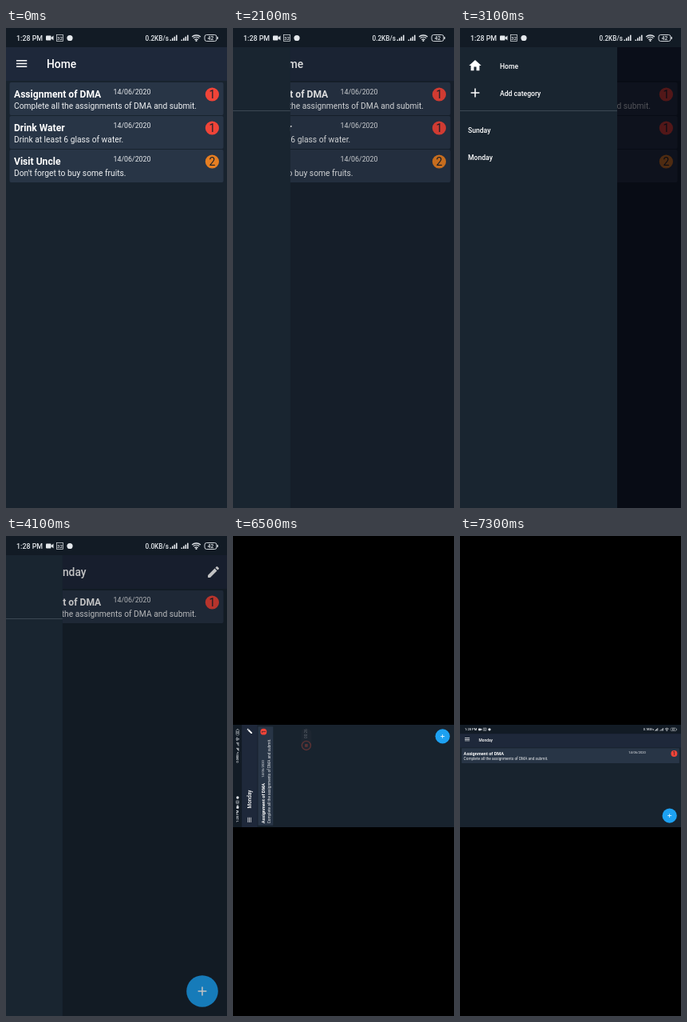
These frames come from a looping animation (277x600 px, 8000 ms). An HTML page with a canvas:

```html
<!DOCTYPE html>
<html lang="en">
<meta charset="utf-8">
<title>To-do app</title>
<style>
  html, body { margin: 0; width: 100%; height: 100%; overflow: hidden; background: #000; }
  canvas { display: block; width: 277px; height: 600px; }
</style>
<canvas></canvas>
<script>
const W = 277, H = 600, LOOP = 8000, STEP = 100;
const DRAWER = 197, LAND = W / H;
const canvas = document.querySelector('canvas');
const dpr = window.devicePixelRatio || 1;
canvas.width = W * dpr;
canvas.height = H * dpr;
const c = canvas.getContext('2d');

const RED = '#f04438', ORANGE = '#e67e22';
const TASKS = [
  ['Assignment of DMA', 'Complete all the assignments of DMA and submit.', 1, RED],
  ['Drink Water', 'Drink at least 6 glass of water.', 1, RED],
  ['Visit Uncle', "Don't forget to buy some fruits.", 2, ORANGE],
];
const ICONS = {
  home: new Path2D('M10 20v-6h4v6h5v-8h3L12 3 2 12h3v8z'),
  plus: new Path2D('M19 13h-6v6h-2v-6H5v-2h6V5h2v6h6z'),
  menu: new Path2D('M3 18h18v-2H3zM3 13h18v-2H3zM3 8h18V6H3z'),
  edit: new Path2D('M3 17.25V21h3.75L17.81 9.94l-3.75-3.75zM20.71 7.04a1 1 0 0 0 0-1.41l-2.34-2.34a1 1 0 0 0-1.41 0l-1.83 1.83 3.75 3.75z'),
};

function rect(x, y, w, h, color, r = 0) {
  c.fillStyle = color;
  c.beginPath();
  c.roundRect(x, y, w, h, r);
  c.fill();
}

function circle(x, y, r, color) {
  c.fillStyle = color;
  c.beginPath();
  c.arc(x, y, r, 0, 7);
  c.fill();
}

function text(str, x, y, size, weight = 400, color = '#fff', align = 'left') {
  c.font = `${weight} ${size}px Roboto, sans-serif`;
  c.textAlign = align;
  c.fillStyle = color;
  c.fillText(str, x, y);
}

function icon(name, x, y, scale = 0.77) {
  c.save();
  c.translate(x, y);
  c.scale(scale, scale);
  c.translate(-12, -12);
  c.fillStyle = '#fff';
  c.fill(ICONS[name]);
  c.restore();
}

function layer(draw, alpha = 1) {
  c.save();
  c.globalAlpha *= alpha;
  draw();
  c.restore();
}

function statusBar(w, speed) {
  rect(0, 0, w, 24, '#121b25');
  const ink = '#e4e8ec';
  text('1:28 PM', 13, 16, 8.9, 500, ink);
  rect(50, 9.5, 6.5, 6, ink, 1);
  c.beginPath();
  c.moveTo(56, 12.5); c.lineTo(59.5, 9.5); c.lineTo(59.5, 15.5);
  c.fill();
  c.strokeStyle = ink;
  c.lineWidth = 0.7;
  c.strokeRect(63.5, 8.5, 8, 8);
  text('32', 67.5, 15, 6, 500, ink, 'center');
  circle(80, 12.5, 3.6, ink);

  layer(() => {
    c.translate(w - W, 0);
    text(speed, 174.5, 16, 8.2, 500, ink);
    for (const x of [205.5, 219.5])
      for (let i = 0; i < 4; i++) rect(x + i * 2.5, 14.5 - i * 1.9, 1.6, 1.5 + i * 1.9, ink);
    c.lineWidth = 1.3;
    for (const r of [3, 5.6, 8]) {
      c.beginPath();
      c.arc(238.5, 17, r, -2.3, -0.84);
      c.stroke();
    }
    circle(238.5, 16, 1.1, ink);
    c.lineWidth = 0.9;
    c.beginPath();
    c.roundRect(249, 8.5, 15, 8, 2.5);
    c.stroke();
    rect(264.5, 11, 1.3, 3, ink);
    text('42', 256.5, 15, 6.5, 500, ink, 'center');
  });
}

function taskCard([title, note, level, color], y, w) {
  rect(4.5, y, w - 9, 41, '#283546', 2);
  text(title, 10, y + 19.2, 12.1, 700);
  text('14/06/2020', w - 142.4, y + 15.4, 8.8, 400, '#e8ebee');
  text(note, 10, y + 33.2, 10.27, 400, '#eef0f2');
  circle(w - 18.6, y + 15, 8.6, color);
  text(level, w - 18.6, y + 20, 14, 400, '#1b222c', 'center');
}

function screen(w, h, monday) {
  const wide = w > h, lift = wide ? 5 : 0;
  rect(0, 0, w, h, '#18232e');
  rect(0, 0, w, 66 - lift, '#1e283a');
  icon('menu', 19.6, 44.5 - lift, 0.74);
  text(monday ? 'Monday' : 'Home', 51, 50 - lift * 1.1, wide ? 10.5 : 13.8, 500);
  TASKS.slice(0, monday ? 1 : 3).forEach((task, i) => taskCard(task, 68 - lift + i * 42, w));
  if (monday) {
    if (!wide) icon('edit', w - 17, 45);
    circle(w - 31, h - 31, 19.8, '#1da1f2');
    icon('plus', w - 31, h - 31);
  }
}

function drawer(open, shade) {
  rect(0, 0, W, H, `rgba(0,0,8,${shade})`);
  layer(() => {
    c.translate(DRAWER * (open - 1), 0);
    rect(0, 0, DRAWER, H, '#192530');
    icon('home', 19, 47);
    text('Home', 50, 50.5, 8.6, 500);
    icon('plus', 19, 81);
    text('Add category', 50, 84.5, 8.6, 500);
    rect(0, 103, DRAWER, 1, '#3c4853');
    text('Sunday', 10, 130.5, 8.6, 500);
    text('Monday', 10, 164.5, 8.6, 500);
  });
}

function recorderBubble() {
  rect(208, 185, 60, 28, '#2b3038', 14);
  c.strokeStyle = '#f0503c';
  c.lineWidth = 3;
  c.beginPath();
  c.arc(221, 199, 12, 0, 7);
  c.stroke();
  rect(217, 195, 8, 8, '#f0503c', 1);
  text('00:26', 253, 202.5, 10, 400, '#fff', 'center');
}

function portrait(t) {
  const monday = t >= 4100;
  screen(W, H, monday);
  let open = 0;
  if (t >= 2100 && t < 4100) open = t < 2500 ? 1 - 0.635 * Math.exp((2100 - t) / 48) : 1;
  else if (t >= 4100 && t < 4500) open = 0.36 * Math.exp((4100 - t) / 60);
  if (open) drawer(open, 0.66 * open ** (monday ? 1 : 1.6));
  statusBar(W, monday ? '0.0KB/s' : '0.2KB/s');
}

function landscape(t) {
  const p = Math.min(1, Math.max(0, (t - 6600) / 400));
  const turn = p * p * (3 - 2 * p);
  c.beginPath();
  c.rect(0, (H - W * LAND) / 2, W, W * LAND);
  c.clip();
  c.translate(W / 2, H / 2);
  c.scale(LAND, LAND);
  if (turn > 0) layer(() => {
    c.rotate((1 - turn) * Math.PI / 2);
    c.translate(-H / 2, -W / 2);
    screen(H, W, true);
    statusBar(H, '0.1KB/s');
  }, turn);
  if (turn < 1) layer(() => {
    c.rotate((turn - 1) * Math.PI / 2);
    c.translate(-W / 2, -H / 2);
    portrait(t);
    layer(recorderBubble, 0.3);
  }, 1 - turn);
}

function frame() {
  const t = Math.floor(performance.now() % LOOP / STEP) * STEP;
  c.setTransform(dpr, 0, 0, dpr, 0, 0);
  rect(0, 0, W, H, '#000');
  layer(() => t < 6500 ? portrait(t) : landscape(t));
  requestAnimationFrame(frame);
}
frame();
</script>
</html>
```
